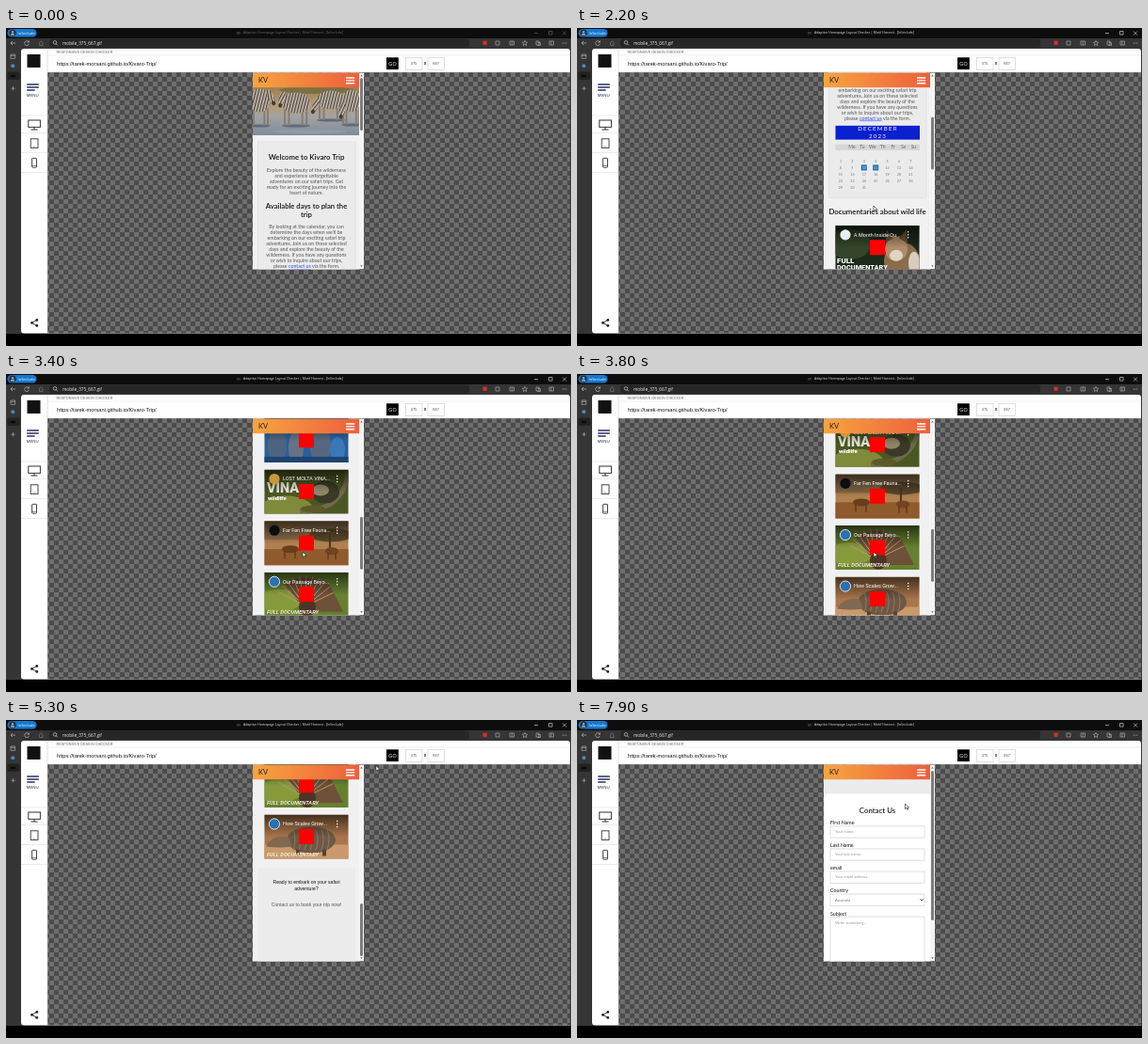
Animation of 600x338 px, one loop 8 s. Source, as an HTML page:

```html
<!DOCTYPE html>
<html lang="en">
<head>
<meta charset="utf-8">
<title>Responsive page preview</title>
<style>
html, body { margin: 0; width: 100%; height: 100%; overflow: hidden; background: #000; }
svg { display: block; width: 600px; height: 338px; }
text { white-space: pre; }
.ui { font-family: "Open Sans", "Noto Sans", sans-serif; }
.sans { font-family: "Liberation Sans", Arial, sans-serif; }
.page { font-family: Lato, sans-serif; }
.vid { font-family: Roboto, sans-serif; }
</style>
</head>
<body>
<svg id="stage" viewBox="0 0 600 338" xmlns="http://www.w3.org/2000/svg"></svg>
<script>
const LOOP = 8000;

const rect = (x, y, w, h, fill, extra = '') =>
  `<rect x="${x}" y="${y}" width="${w}" height="${h}" fill="${fill}" ${extra}/>`;
const circle = (x, y, r, fill, extra = '') =>
  `<circle cx="${x}" cy="${y}" r="${r}" fill="${fill}" ${extra}/>`;
const oval = (x, y, rx, ry, fill, extra = '') =>
  `<ellipse cx="${x}" cy="${y}" rx="${rx}" ry="${ry}" fill="${fill}" ${extra}/>`;
const shape = (d, fill) => `<path d="${d}" fill="${fill}"/>`;
const line = (d, color, w = 0.8, extra = '') =>
  `<path d="${d}" fill="none" stroke="${color}" stroke-width="${w}" ${extra}/>`;
// y is the middle of the lowercase letters
const text = (x, y, size, str, fill, cls = 'page', extra = '') =>
  `<text x="${x}" y="${y + size * 0.33}" font-size="${size}" fill="${fill}" class="${cls}" ${extra}>${str}</text>`;
const MID = 'text-anchor="middle"';
const centered = (y, size, str, fill, extra = '') => text(319, y, size, str, fill, 'page', MID + ' ' + extra);
const lines = (y, step, size, fill, rows) =>
  rows.map((row, i) => centered(y + i * step, size, row, fill)).join('');
const box = (x, y, w, h) => rect(x, y, w, h, '#fff', 'stroke="#c8c8c8" stroke-width=".6"');

const defs = `<defs>
  <pattern id="check" x="16" y="22" width="10" height="10" patternUnits="userSpaceOnUse">
    ${rect(0, 0, 10, 10, '#6e6e6e')}${rect(0, 0, 5, 5, '#4b4b4b')}${rect(5, 5, 5, 5, '#4b4b4b')}
  </pattern>
  <pattern id="stripes" width="3" height="3" patternUnits="userSpaceOnUse" patternTransform="rotate(14)">
    ${rect(0, 0, 3, 3, '#cfc5b8')}${rect(0, 0, 1.4, 3, '#4d443d')}
  </pattern>
  <linearGradient id="bar"><stop offset="0" stop-color="#f7a440"/><stop offset="1" stop-color="#ee5f3c"/></linearGradient>
  <linearGradient id="water" x2="0" y2="1">
    <stop offset="0" stop-color="#9c7f50"/><stop offset=".4" stop-color="#b59c74"/>
    <stop offset=".6" stop-color="#a3a3a3"/><stop offset="1" stop-color="#7f8b99"/>
  </linearGradient>
  <linearGradient id="shade" x2="0" y2="1">
    <stop offset="0" stop-color="#000" stop-opacity=".6"/><stop offset=".5" stop-color="#000" stop-opacity="0"/>
  </linearGradient>
  <clipPath id="view">${rect(262, 47.5, 118, 209, '#000')}</clipPath>
  <clipPath id="thumb">${rect(274.5, 0, 89, 47, '#000')}</clipPath>
  <clipPath id="hero">${rect(262, 63, 113, 51, '#000')}</clipPath>
</defs>`;

function browser() {
  let s = rect(0, 0, 600, 338, '#000') + rect(0, 0, 600, 11, '#0d0d0d') +
    rect(0, 11, 600, 314, '#353535') + rect(46, 11.5, 446, 9, '#262626', 'rx="2"');
  s += rect(1.5, 1, 31, 8.6, '#1579cf', 'rx="4.3"') + circle(7, 5.2, 3.6, '#24303c') +
    circle(7, 4.2, 1.2, '#9aa5b0') + shape('M4.8 7.8a2.2 2.2 0 0 1 4.4 0z', '#9aa5b0');
  s += text(12.6, 5.2, 4, 'InSeclude', '#fff', 'ui');
  s += rect(245, 4, 4, 2.6, '#333');
  s += `<g id="title">${text(252, 5.3, 3.5, 'Adaptive Homepage Layout Checker | Motif Harvest - [InSeclude]', 'currentColor', 'ui')}` +
    `${line('M561 5.5h4M576.5 3.5h3.6v3.6h-3.6zM591 3.5l4 4m0-4l-4 4', 'currentColor', 0.6)}</g>`;
  s += line('M10 16H5m2-2l-2 2l2 2M24.2 15a2.4 2.4 0 1 0 .2 1.8M24.4 13.4v1.8h-1.8', '#bbb', 0.7);
  s += line('M35 16l2.3-2.2l2.3 2.2M35.6 16v2.6h3.4V16', '#888', 0.6);
  s += circle(52, 15.4, 1.8, 'none', 'stroke="#ccc" stroke-width=".7"') + line('M53.3 16.8l1.6 1.6', '#ccc');
  s += text(60, 16.1, 4.7, 'mobile_375_667.gif', '#eee', 'ui');
  s += rect(506.5, 13.7, 4.2, 4.2, '#d8302c');
  s += line('M520 14h4v4h-4zM535 14h4.5v4H535zM537.3 14v4M551 13.4l.8 1.7 1.9.2-1.4 1.3.4 1.9-1.7-1-1.7 1 .4-1.9-1.4-1.3 1.9-.2z', '#bbb', 0.6);
  s += line('M563 14h3v4h-3zM564.5 15.5h3v3h-3M577 14h4.5v4H577zM579 14v4', '#bbb', 0.6);
  s += [-1.8, 0, 1.8].map(d => circle(593 + d, 16, 0.5, '#bbb')).join('');
  s += line('M5 28h4.6v4.4H5zM5 29.4h4.6', '#bbb', 0.6);
  s += circle(7.3, 40.3, 2, '#4f86c9') + rect(1.5, 46.5, 13, 8.5, '#222', 'rx="1.5"') +
    rect(4.8, 49.8, 5, 2.4, '#0a0a0a') + line('M7.5 62v4.4M5.3 64.2h4.4', '#bbb', 0.6);
  return s;
}

function tester() {
  let s = `<path d="M19 22H596a3 3 0 0 1 3 3V324.5H19a3 3 0 0 1-3-3V25a3 3 0 0 1 3-3z" fill="#fff"/>`;
  s += rect(44, 47, 555, 277.5, 'url(#check)') + line('M44 22V324', '#ccc', 0.6) +
    line('M44 29H599', '#e6e6e6', 0.6) + line('M44 47H599', '#bbb', 0.5);
  s += rect(22.5, 28, 14, 14, '#111');
  s += line('M22.2 60h12.6M22.2 63h12.6M22.2 66h8.4', '#27325f', 1.4);
  s += text(28.2, 71.5, 4.4, 'MENU', '#222a48', 'sans', MID);
  s += line('M16 93H44M16 111.5H44M16 132.5H44M16 153.5H44', '#ddd', 0.6);
  s += rect(23.8, 98, 12.6, 7.4, '#fff', 'stroke="#333" stroke-width="1"') + line('M30 105v3M26.5 108h7', '#333', 1);
  s += rect(26.2, 117.8, 7.8, 9.6, '#fff', 'stroke="#333" stroke-width=".9"') + circle(30, 126, 0.5, '#333');
  s += rect(27.6, 138.4, 4.9, 9.8, '#fff', 'stroke="#333" stroke-width=".9" rx=".6"') + line('M27.6 146.4h5', '#333', 0.6);
  s += line('M32.6 310.5L27.6 313.4L32.6 316.3', '#222', 0.9) +
    circle(32.8, 310.4, 1.4, '#222') + circle(27.5, 313.4, 1.4, '#222') + circle(32.8, 316.4, 1.4, '#222');
  s += text(53.5, 25.6, 3.8, 'RESPONSIVE DESIGN CHECKER', '#666', 'sans');
  s += text(54, 37.8, 5.7, 'https://tarek-morsani.github.io/Kivaro-Trip/', '#111', 'sans');
  s += rect(404, 31.3, 12.8, 12.8, '#000') + text(410.4, 37.8, 5.4, 'GO', '#fff', 'sans', MID);
  s += box(424.5, 31.5, 17.5, 13) + box(448, 31.5, 17.5, 13);
  s += text(433, 38, 4, '375', '#444', 'sans', MID) + text(456.7, 38, 4, '667', '#444', 'sans', MID);
  s += text(445, 37.6, 4.6, 'x', '#222', 'sans', MID + ' font-weight="700"');
  return s;
}

// Feet stand at y; a pale rump or chest faces the viewer
function zebra(x, y, w, h) {
  const legs = [-0.8, -0.5, 0.45, 0.75].map(k => rect(x + k * w - 0.9, y - h, 1.8, h, '#857a6f')).join('');
  return oval(x, y, w, 1.6, '#616a74') + legs + oval(x, y - h * 1.35, w, h * 0.62, 'url(#stripes)');
}
const head = (x, y, lean) => `<g transform="translate(${x} ${y}) rotate(${lean})">` +
  oval(0, 0, 3.2, 8.5, 'url(#stripes)') + oval(0, 7.5, 2, 2.4, '#443b36') + '</g>';

function hero() {
  let s = rect(262, 63, 113, 51, 'url(#water)');
  s += oval(330, 66, 40, 4, '#7d7040') + oval(322, 110, 40, 2.4, '#8f9aa6');
  s += zebra(345, 98, 15, 16) + zebra(367, 103, 11, 19) + zebra(308, 104, 15, 18) + zebra(269, 104, 12, 20);
  s += head(281, 73, -25) + head(293, 75, 14) + head(329, 82, 24) + head(357, 87, 10);
  return `<g clip-path="url(#hero)">${s}</g>`;
}

function calendar() {
  let s = rect(274.5, 261.5, 89.5, 14.8, '#0b20cf');
  s += text(319.5, 265, 6.2, 'DECEMBER', '#fff', 'page', MID + ' letter-spacing="1.2"');
  s += text(319.5, 272.8, 6.2, '2023', '#fff', 'page', MID + ' letter-spacing="1.2"');
  s += rect(274.5, 281.3, 89.5, 6.3, '#d6d6d8');
  'Mo Tu We Th Fr Sa Su'.split(' ').forEach((d, i) => s += text(292 + i * 10.9, 284.4, 5, d, '#666', 'page', MID));
  for (let d = 1; d <= 31; d++) {
    const x = 280 + (d - 1) % 7 * 12.4, y = 299 + Math.floor((d - 1) / 7) * 7.1;
    const on = d === 10 || d === 11;
    if (on) s += rect(x - 3, y - 3, 6, 6, '#1c6fae');
    s += text(x, y, 3.7, d, on ? '#fff' : '#777', 'page', MID);
  }
  return s;
}

const caption = `<g font-weight="700">${text(277, 42.6, 5.8, 'FULL DOCUMENTARY', '#f4ead8', 'vid', 'font-style="italic"')}</g>`;
const back = c => rect(274, 0, 90, 48, c);
const ray = (a, r) => `M318 36L${318 + r * Math.cos(a)} ${36 - r * Math.sin(a)}`;
const videos = [
  { name: 'A Month Inside Qu...', dot: '#e9eef0', art:
    back('#1d2a1c') + oval(290, 20, 22, 16, '#34452a') + oval(345, 38, 19, 20, '#8a6c4c') + oval(339, 25, 12, 13, '#b08d68') +
    shape('M328 18L329 5L336 14zM342 14L350 4L351 19z', '#6f5238') + oval(339, 32, 7, 6, '#e0d4c0') + oval(358, 40, 6, 12, '#d8cdbc') +
    `<g font-weight="800">${text(276, 38, 8, 'FULL', '#fff', 'vid')}${text(276, 45, 7.4, 'DOCUMENTARY', '#fff', 'vid')}</g>` },
  { name: 'Wandering Past Hi...', dot: '#31502f', art:
    back('#2b5f9c') + oval(288, 30, 10, 18, '#4b6580') + oval(308, 32, 8, 19, '#657184') + oval(334, 30, 11, 20, '#56687f') +
    oval(352, 34, 8, 14, '#3a78b8') + rect(274, 41, 90, 7, '#1d4470') },
  { name: 'LOST MOLTA VINA...', dot: '#c9973e', art:
    back('#4b5722') + oval(298, 42, 28, 14, '#7f8a3a') + line('M312 44Q340 44 352 30T362 2', '#6f6a4c', 5) +
    oval(339, 24, 15, 12, '#3a3a26') + oval(334, 22, 9, 6, '#8f8566') + oval(326, 42, 13, 4, '#5d5a28') +
    `<g font-weight="800">${text(277, 20, 14.5, 'VINA', '#eceade', 'vid')}${text(278, 30, 6, 'wildlife', '#fff', 'vid')}</g>` },
  { name: 'Far Fen Free Fauna...', dot: '#0d0d0d', art:
    back('#b08050') + rect(274, 0, 90, 20, '#8a6d4c') + oval(345, 15, 23, 7, '#5d4a2c') + rect(343, 15, 2, 15, '#4a3820') +
    rect(274, 30, 90, 18, '#8f5a2c') + oval(302, 30, 9, 4, '#6b3c1d') + oval(346, 32, 7, 4, '#74431f') +
    line('M296 32v8M307 32v8M342 34v7M350 34v7', '#5a3116', 1.2) },
  { name: 'Our Passage Beyo...', dot: '#2a70b4', ring: true, art:
    back('#66802f') + oval(290, 30, 24, 12, '#869a3c') + shape('M318 42L296 12Q318 -2 344 14L358 42z', '#6d5138') +
    line([...Array(11)].map((_, i) => ray(0.45 + i * 0.22, 33)).join(''), '#b59670', 1) + oval(320, 37, 9, 10, '#4b3626') + caption },
  { name: 'How Scales Grow...', dot: '#2a70b4', ring: true, art:
    back('#a9764b') + rect(274, 32, 90, 16, '#c99a6b') + oval(324, 27, 26, 14, '#6e5846') +
    shape('M300 24Q284 20 276 34Q290 36 304 34z', '#806853') +
    line([...Array(7)].map((_, i) => `M${305 + i * 6} 16q4 10 0 22`).join(''), '#927a63', 1) +
    line('M310 37v7M338 37v7', '#57432f', 4) + caption }
];

function video(v, i) {
  const ring = v.ring ? 'stroke="#eee" stroke-width=".9"' : '';
  let s = v.art + rect(274, 0, 90, 48, 'url(#shade)') + circle(285, 10, 5.6, v.dot, ring);
  s += text(294, 10, 5.5, v.name, '#fff', 'vid') + [7, 10, 13].map(y => circle(351.7, y, 0.75, '#fff')).join('');
  s += rect(311, 15.4, 16, 16, '#f00');
  if (i === 2) s += `<rect id="veil" x="274" width="90" height="48"/>`;
  return `<g transform="translate(0 ${367.5 + i * 54.6})"><g clip-path="url(#thumb)">${s}</g></g>`;
}

function home() {
  const bold = 'font-weight="600"';
  let s = rect(262, 47, 113, 760, '#f1f1f2') + hero();
  s += rect(267.5, 121, 103.5, 217, '#ebebec', 'stroke="#d9d9dc" stroke-width=".6"');
  s += centered(137.8, 7.8, 'Welcome to Kivaro Trip', '#111', bold);
  s += lines(151.3, 6, 5.25, '#555', ['Explore the beauty of the wilderness', 'and experience unforgettable',
    'adventures on our safari trips. Get', 'ready for an exciting journey into the', 'heart of nature.']);
  s += centered(189, 7.7, 'Available days to plan the', '#111', bold) + centered(198, 7.7, 'trip', '#111', bold);
  s += lines(211.5, 6, 5.25, '#555', ['By looking at the calendar, you can', "determine the days when we'll be",
    'embarking on our exciting safari trip', 'adventures. Join us on these selected', 'days and explore the beauty of the',
    'wilderness. If you have any questions', 'or wish to inquire about our trips,',
    'please <tspan fill="#2a49e0" text-decoration="underline">contact us</tspan> via the form.']);
  s += calendar() + centered(352.8, 7.8, 'Documentaries about wild life', '#111', bold);
  s += videos.map(video).join('');
  s += rect(267.5, 697, 103.5, 120, '#ececed');
  s += text(319, 712.8, 5.1, 'Ready to embark on your safari', '#111', 'sans', MID) +
    text(319, 719, 5.1, 'adventure?', '#111', 'sans', MID) +
    text(319, 736.7, 5.1, 'Contact us to book your trip now!', '#555', 'sans', MID);
  return s;
}

function contact() {
  let s = rect(262, 47, 113, 210, '#fff') + rect(262, 63, 113, 15, '#ececec') + line('M262 78H375', '#ddd', 0.6);
  s += centered(96.3, 7.9, 'Contact Us', '#111', 'font-weight="500"');
  const fields = [['First Name', 'Your name..'], ['Last Name', 'Your last name..'], ['email', 'Your email address..'],
    ['Country', 'Australia'], ['Subject', 'Write something..']];
  fields.forEach(([label, hint], i) => {
    const y = 109.6 + i * 24.05;
    s += text(269, y, 5.3, label, '#111') + box(269, y + 3.3, 100, i === 4 ? 60 : 12.2);
    s += text(274, y + 9.4, 4.2, hint, i === 3 ? '#777' : '#999');
  });
  return s + line('M364.6 190.4l1.5 1.6l1.5-1.6', '#222', 0.9);
}

const frame = rect(262, 47.5, 113, 15.7, 'url(#bar)') + text(268, 55.6, 7.6, 'KV', '#222') +
  line('M361 53h9.2M361 55.9h9.2M361 58.8h9.2', '#fff', 1.4) + rect(375, 47.5, 5, 209, '#f4f4f4') +
  shape('M376.2 51.4h2.6l-1.3-1.7zM376.2 252.3h2.6l-1.3 1.7z', '#666') +
  `<rect id="grip" x="376" width="3" rx="1.5" fill="#7d7d7d"/>`;

const $ = id => document.getElementById(id);
$('stage').innerHTML = defs + browser() + tester() +
  `<g clip-path="url(#view)"><g id="home">${home()}</g><g id="contact">${contact()}</g>${frame}</g>` +
  `<path id="cursor" d="M0 0V5.6L1.4 4.4L2.3 6.4L3.2 6L2.3 4.1H4.1z" fill="#fff" stroke="#111" stroke-width=".6"/>`;

// Keys are [time, ...values]; values between keys are linear
function track(keys, t) {
  let i = 0;
  while (i < keys.length - 2 && t >= keys[i + 1][0]) i++;
  const [a, b] = [keys[i], keys[i + 1]];
  const k = Math.min(1, Math.max(0, (t - a[0]) / (b[0] - a[0])));
  return a.slice(1).map((v, n) => v + (b[n + 1] - v) * k);
}
const scrollKeys = [[1500, 0], [1600, 60], [2800, 255], [3400, 375], [4300, 487], [4700, 540]];
const cursorKeys = [[550, 592, 14], [1100, 315, 189], [4800, 315, 189], [5200, 402, 46], [5600, 366, 56],
  [5900, 340, 130], [6200, 325, 215], [6300, 328, 208], [6400, 332.5, 192], [6600, 399, 44], [6800, 399, 44],
  [7200, 340, 140], [7700, 327.5, 104], [7800, 327.5, 104], [7900, 348.5, 89]];

function draw(t) {
  const [scroll] = track(scrollKeys, t);
  const [x, y] = track(cursorKeys, t);
  const form = t >= 5900;
  $('title').setAttribute('color', t < 600 ? '#6a6a6a' : '#e4e4e4');
  $('home').setAttribute('transform', `translate(0 ${-scroll})`);
  $('home').style.display = form ? 'none' : '';
  $('contact').style.display = form ? '' : 'none';
  $('grip').setAttribute('y', form ? 54 : 53 + scroll * 0.263);
  $('grip').setAttribute('height', form ? 159 : 56);
  $('veil').setAttribute('opacity', track([[2800, 0.5], [3200, 0]], t)[0]);
  $('cursor').style.display = t < 600 ? 'none' : '';
  $('cursor').setAttribute('transform', `translate(${x} ${y})`);
}

function tick() {
  draw(performance.now() % LOOP);
  requestAnimationFrame(tick);
}
tick();
</script>
</body>
</html>
```
